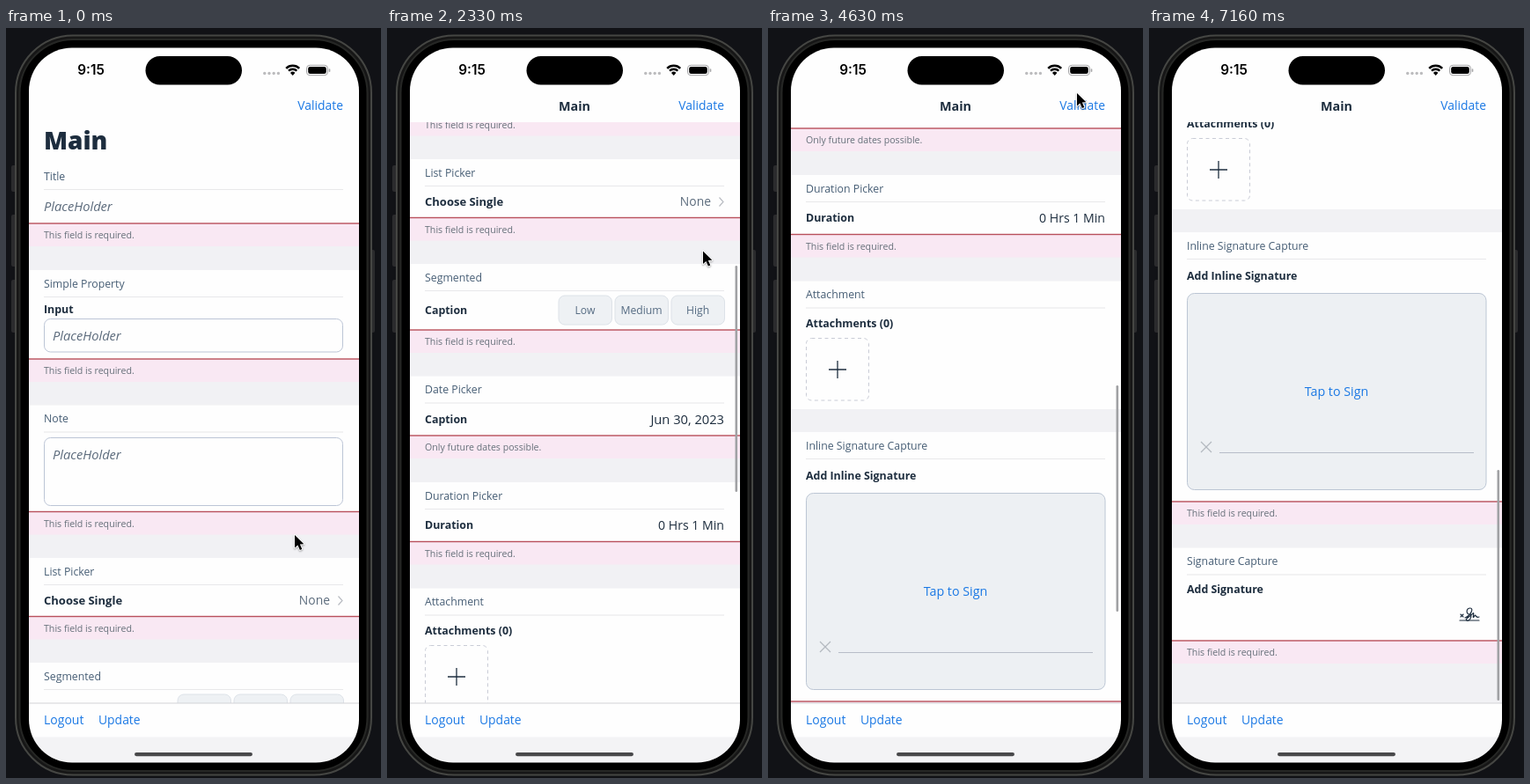
These frames come from a looping animation (426 by 852 pixels, 7.63 s). An HTML page with a canvas:

```html
<!DOCTYPE html>
<html lang="en">
<head>
<meta charset="utf-8">
<title>Form validation</title>
<style>
  html, body { margin: 0; width: 100%; height: 100%; overflow: hidden; background: #111216; }
  canvas { display: block; width: 426px; height: 852px; }
</style>
</head>
<body>
<canvas id="stage"></canvas>
<script>
const W = 426, H = 852, LOOP = 7630;
const canvas = document.getElementById('stage');
const dpr = window.devicePixelRatio || 1;
canvas.width = W * dpr;
canvas.height = H * dpr;
const ctx = canvas.getContext('2d');

const SANS = '"Open Sans", "Noto Sans", sans-serif';
const INK = '#1d2d3e', MUTED = '#475e75', BLUE = '#1a78e4', WHITE = '#fefefe', GREY = '#f1f1f4';
const LEFT = 43, RIGHT = 383, VIEW_TOP = 107, VIEW_BOTTOM = 767;

// Key rows: [position, value, value...]
const SCROLL = [[0, 0], [330, 0], [730, 70], [1060, 150], [1230, 196], [2330, 453], [2760, 534],
  [3830, 534], [4360, 719], [4630, 802], [5130, 888], [5730, 888], [5960, 1040], [6330, 1029], [LOOP, 1029]];
const POINTER = [[0, 328, 576], [400, 342, 440], [1060, 359, 253.5], [2830, 359, 253.5], [3430, 358, 259.5],
  [3830, 358, 259.5], [4360, 351, 74], [4660, 351, 74], [5330, 277, 519], [5730, 277, 519],
  [6030, 346, 350], [6930, 346, 350], [7030, 220, 190], [7160, -40, 10], [LOOP, -40, 10]];
const THUMB = [[0, 108, 400], [196, 180, 480], [453, 270, 527], [534, 307, 571],
  [802, 406, 663], [888, 446, 708], [1029, 502, 764]];

const REQUIRED = 'This field is required.';
// [top, heading, error line, message]
const SECTIONS = [
  [153, 'Title', 222, REQUIRED],
  [275, 'Simple Property', 376, REQUIRED],
  [428.5, 'Note', 549.5, REQUIRED],
  [602, 'List Picker', 668.5, REQUIRED],
  [721, 'Segmented', 796, REQUIRED],
  [848.5, 'Date Picker', 916, 'Only future dates possible.'],
  [969, 'Duration Picker', 1036.5, REQUIRED],
  [1089.5, 'Attachment', 1235, ''],
  [1261, 'Inline Signature Capture', 1567, REQUIRED],
  [1619.5, 'Signature Capture', 1725, REQUIRED]
];

// Smooth interpolation that stays level next to flat stretches
function track(keys, p) {
  const last = keys.length - 1;
  if (p <= keys[0][0]) return keys[0].slice(1);
  if (p >= keys[last][0]) return keys[last].slice(1);
  let i = 0;
  while (keys[i + 1][0] <= p) i++;
  const a = keys[i], b = keys[i + 1], span = b[0] - a[0], u = (p - a[0]) / span;
  const slope = (j, c) => (keys[j + 1][c] - keys[j][c]) / (keys[j + 1][0] - keys[j][0]);
  const tangent = (j, c) => {
    if (j === 0 || j === last) return slope(Math.min(j, last - 1), c);
    const l = slope(j - 1, c), r = slope(j, c);
    return l * r <= 0 ? 0 : 2 * l * r / (l + r);
  };
  return a.slice(1).map((v, k) => {
    const c = k + 1, u2 = u * u, u3 = u2 * u;
    return v * (2 * u3 - 3 * u2 + 1) + b[c] * (3 * u2 - 2 * u3) +
      span * (tangent(i, c) * (u3 - 2 * u2 + u) + tangent(i + 1, c) * (u3 - u2));
  });
}

function refresh(t) {
  const base = Math.floor(t / 100) * 100, m = t - base;
  return Math.max(0, m < 30 ? base - 40 : m < 60 ? base + 30 : base + 60);
}

function rect(x, y, w, h, color) {
  ctx.fillStyle = color;
  ctx.fillRect(x, y, w, h);
}

function round(x, y, w, h, r, fill, stroke, width = 1) {
  ctx.beginPath();
  ctx.roundRect(x, y, w, h, r);
  if (fill) { ctx.fillStyle = fill; ctx.fill(); }
  if (stroke) { ctx.strokeStyle = stroke; ctx.lineWidth = width; ctx.stroke(); }
}

function line(points, color, width = 1) {
  ctx.beginPath();
  points.forEach(([x, y], i) => i ? ctx.lineTo(x, y) : ctx.moveTo(x, y));
  ctx.strokeStyle = color;
  ctx.lineWidth = width;
  ctx.stroke();
}

// y is the middle of the capital letters
function text(str, x, y, size, color, style = '', align = 'left', family = SANS) {
  ctx.font = `${style} ${size}px ${family}`;
  ctx.textAlign = align;
  ctx.fillStyle = color;
  ctx.fillText(str, x, y + size * 0.357);
}

const label = (str, y, size = 12.4) => text(str, LEFT, y, size, INK, '700');
const hint = (x, y) => text('PlaceHolder', x, y, 14.7, '#5c6b7c', 'italic');
const value = (str, y, size) => text(str, RIGHT, y, size, INK, '', 'right');

function drawPhone() {
  rect(0, 0, W, H, '#111216');
  [[156, 30], [212, 59], [286, 60]].forEach(([y, h]) => round(6, y, 8, h, 2, '#2b2b2d'));
  round(411, 252, 8, 94, 2, '#2b2b2d');
  round(11, 8.5, 404, 840, 65, '#161616', '#454643', 2);
  round(15.5, 13, 395, 831, 61, '#000', '#262725', 2);
}

function drawStatus() {
  text('9:15', 96.5, 48, 15.3, '#000', '600', 'center', 'Inter, sans-serif');
  round(158.5, 32, 109.5, 32.5, 16.2, '#000');
  for (let i = 0; i < 4; i++) {
    ctx.beginPath();
    ctx.arc(293.8 + i * 5.2, 51.5, 1.7, 0, 7);
    ctx.fillStyle = '#bcbcbe';
    ctx.fill();
  }
  ctx.strokeStyle = '#000';
  [[10.6, 2.5], [6.6, 2.4]].forEach(([r, w]) => {
    ctx.beginPath();
    ctx.arc(325.7, 53.3, r, -Math.PI * 0.75, -Math.PI * 0.25);
    ctx.lineWidth = w;
    ctx.stroke();
  });
  ctx.beginPath();
  ctx.moveTo(325.7, 54);
  ctx.arc(325.7, 53.3, 3.6, -Math.PI * 0.77, -Math.PI * 0.23);
  ctx.fillStyle = '#000';
  ctx.fill();
  round(341.5, 42.3, 24, 11.4, 3.6, null, '#a3a3a5');
  round(343.2, 44, 20.6, 8, 2.3, '#000');
  round(366.8, 46.2, 1.5, 3.8, 0.8, '#a3a3a5');
}

function drawSection([top, title, end, message]) {
  rect(26, top, 375, end - top, WHITE);
  text(title, LEFT, top + 15.2, 12.3, MUTED);
  rect(LEFT, top + 30, RIGHT - LEFT, 1, '#e8e8ea');
  if (!message) return;
  rect(26, end, 375, 26, '#f9e8f3');
  rect(26, end - 0.7, 375, 1.4, '#b9505c');
  text(message, LEFT, end + 13.4, 10.62, '#66707a');
}

function drawSignature(x, y) {
  ctx.save();
  ctx.translate(x, y);
  ctx.lineCap = 'round';
  line([[-11, 6], [11, 6]], INK, 1.2);
  line([[-10, -1], [-7, 2]], INK, 1.1);
  line([[-7, -1], [-10, 2]], INK, 1.1);
  ctx.beginPath();
  ctx.moveTo(-5, 3);
  ctx.bezierCurveTo(2, 0, 5, -8, 1, -8);
  ctx.bezierCurveTo(-4, -8, -4, -1, 0, -1);
  ctx.bezierCurveTo(4, -2, 1, 8, -3, 6);
  ctx.bezierCurveTo(-6, 4, 2, 1, 4, -2);
  ctx.bezierCurveTo(6, -4, 3, 4, 5, 2);
  ctx.bezierCurveTo(8, -3, 6, 4, 11, 2);
  ctx.lineWidth = 1.2;
  ctx.stroke();
  ctx.restore();
}

function drawRows() {
  hint(LEFT, 202.5);

  label('Input', 320);
  round(43.5, 330.5, 339, 37.5, 7, WHITE, '#bcc5d6');
  hint(53, 349.5);

  round(43.5, 465.5, 339, 77, 7, WHITE, '#bcc5d6');
  hint(53, 484.5);

  label('Choose Single', 650.5, 13);
  text('None', 368, 650.5, 13.9, '#5b6b7c', '', 'right');
  line([[377.5, 645.5], [382, 650.5], [377.5, 655.5]], '#b9bcc2', 1.2);

  label('Caption', 773.5);
  ['Low', 'Medium', 'High'].forEach((name, i) => {
    const x = 195 + i * 64;
    round(x, 757, 60.5, 33, 7, '#eef1f4', '#dde2e8');
    text(name, x + 30, 773.5, 12.2, '#556b82', '', 'center');
  });

  label('Caption', 897.5);
  value('Jun 30, 2023', 897.5, 14.7);
  label('Duration', 1018);
  value('0 Hrs 1 Min', 1018, 14.1);

  label('Attachments (0)', 1137.5);
  ctx.setLineDash([4, 3.5]);
  round(43.5, 1154.5, 71, 70.5, 6, null, '#c9ccd6');
  ctx.setLineDash([]);
  line([[69, 1190], [89, 1190]], INK, 1.3);
  line([[79, 1180], [79, 1200]], INK, 1.3);

  label('Add Inline Signature', 1311);
  round(43.5, 1330.5, 339.5, 223, 8, '#edf0f3', '#bcc6d4');
  text('Tap to Sign', 213, 1441.5, 14.3, BLUE, '', 'center');
  line([[59, 1499], [71, 1511]], '#b4b9c0', 1.2);
  line([[71, 1499], [59, 1511]], '#b4b9c0', 1.2);
  rect(80, 1511, 289, 1, '#b7bdc8');

  label('Add Signature', 1667);
  drawSignature(364, 1696);
}

function drawContent(scroll) {
  ctx.save();
  ctx.beginPath();
  ctx.rect(26, VIEW_TOP, 375, VIEW_BOTTOM - VIEW_TOP);
  ctx.clip();
  rect(26, VIEW_TOP, 375, VIEW_BOTTOM - VIEW_TOP, GREY);
  ctx.translate(0, -scroll);
  rect(26, 60, 375, 95, WHITE);
  SECTIONS.forEach(drawSection);
  drawRows();
  text('Main', LEFT, 128.5, 28, INK, '800');
  ctx.restore();
}

function drawBars(scroll) {
  rect(26, 20, 375, VIEW_TOP - 20, WHITE);
  ctx.globalAlpha = Math.min(1, Math.max(0, (scroll - 35) / 15));
  text('Main', 213, 88.5, 14.4, INK, '700', 'center');
  ctx.globalAlpha = 1;
  text('Validate', RIGHT, 88.5, 13.9, BLUE, '', 'right');
  rect(26, VIEW_BOTTOM, 375, 39, WHITE);
  rect(26, VIEW_BOTTOM - 0.5, 375, 1, '#d3d3d8');
  rect(26, 805.5, 375, 31, '#f3f3f5');
  text('Logout', LEFT, 786, 14, BLUE);
  text('Update', 105, 786, 13.9, BLUE);
  round(146, 823, 134, 4.2, 2.1, '#48484a');
}

function drawPointer(x, y) {
  ctx.save();
  ctx.translate(x, y);
  ctx.beginPath();
  [[0, 0], [0, 14.5], [3.4, 11.4], [5.9, 17], [8.3, 15.9], [5.9, 10.5], [10.4, 10.3]]
    .forEach(([px, py], i) => i ? ctx.lineTo(px, py) : ctx.moveTo(px, py));
  ctx.closePath();
  ctx.lineJoin = 'round';
  ctx.strokeStyle = '#fff';
  ctx.lineWidth = 1.8;
  ctx.shadowColor = 'rgba(0,0,0,.35)';
  ctx.shadowBlur = 2 * dpr;
  ctx.shadowOffsetY = dpr;
  ctx.stroke();
  ctx.shadowColor = 'transparent';
  ctx.fillStyle = '#000';
  ctx.fill();
  ctx.restore();
}

function draw(time) {
  const t = refresh(time);
  const [scroll] = track(SCROLL, t);
  ctx.setTransform(dpr, 0, 0, dpr, 0, 0);
  drawPhone();
  ctx.save();
  ctx.beginPath();
  ctx.roundRect(26, 22.5, 375, 812, 49);
  ctx.clip();
  drawContent(scroll);
  drawBars(scroll);
  drawStatus();
  if (scroll > 0) {
    const [top, bottom] = track(THUMB, scroll);
    round(395.5, top, 2.6, bottom - top, 1.3, '#a0a1a4');
  }
  ctx.restore();
  const [x, y] = track(POINTER, t);
  drawPointer(x, y);
}

const start = performance.now();
function tick() {
  draw((performance.now() - start) % LOOP);
  requestAnimationFrame(tick);
}
tick();
</script>
</body>
</html>
```
